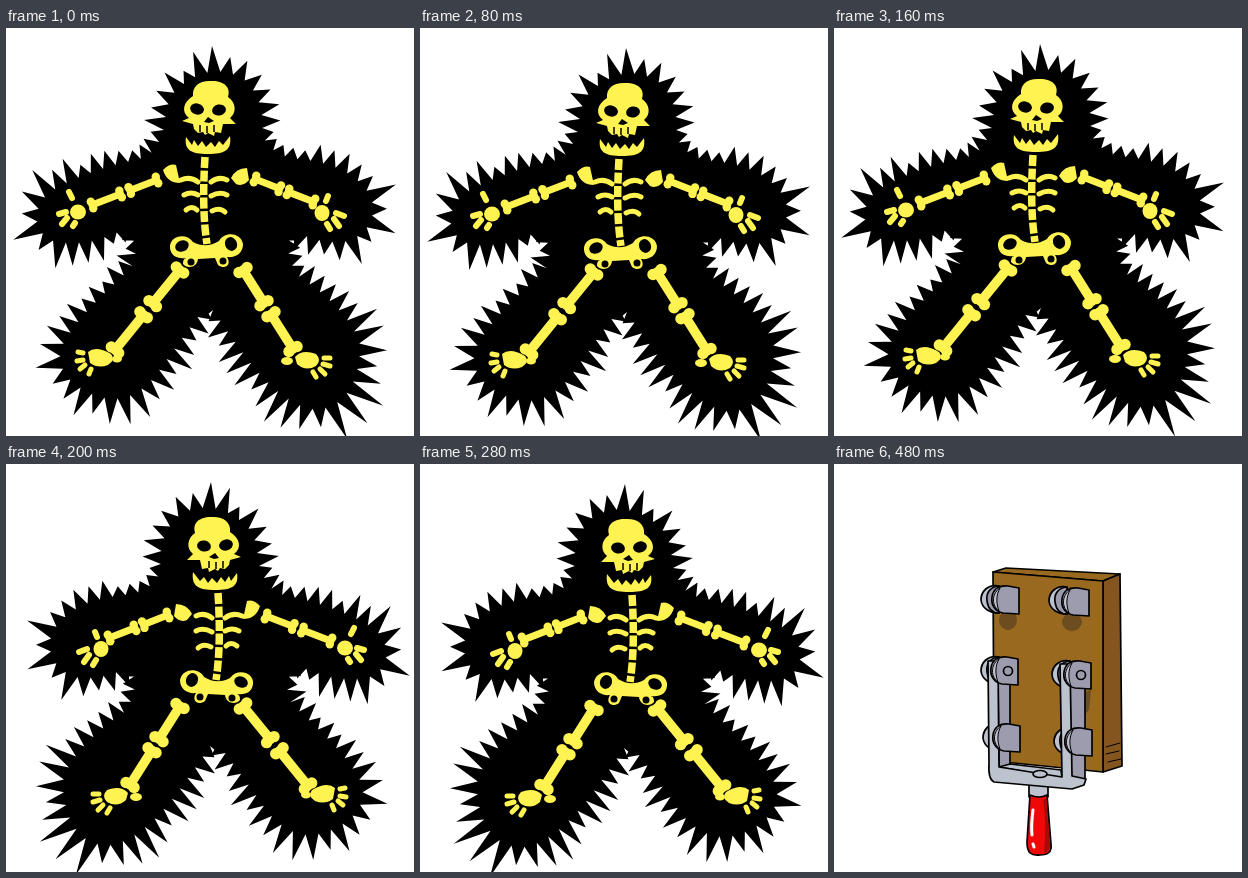
Animation of 408x408 px, one loop 0.68 s. Source, as an HTML page:

```html
<!DOCTYPE html>
<html lang="en">
<head>
<meta charset="utf-8">
<title>Knife switch shock</title>
<style>
html, body { margin: 0; width: 100%; height: 100%; overflow: hidden; background: #fff; }
svg { display: block; width: 100%; height: 100%; }

#shock, #up, #down, #jolt { animation: 680ms step-end infinite; }
#shock { animation-name: shock; }
#up { animation-name: up; }
#down { animation-name: down; }
#jolt { animation-name: jolt; }

@keyframes shock { 0% { visibility: visible; } 47.05%, 100% { visibility: hidden; } }
@keyframes up { 0% { visibility: hidden; } 47.05% { visibility: visible; } 70.58%, 100% { visibility: hidden; } }
@keyframes down { 0% { visibility: hidden; } 70.58%, 100% { visibility: visible; } }

/* The body flips left and right while it hops up and down. */
@keyframes jolt {
  0% { transform: none; }
  5.88% { transform: translate(411px, -2px) scaleX(-1); }
  11.76% { transform: translate(0, 2px); }
  17.64% { transform: translate(411px, 5px) scaleX(-1); }
  23.52% { transform: translate(0, -2px); }
  29.41% { transform: translate(411px, 0) scaleX(-1); }
  35.29% { transform: translate(0, -5px); }
  41.17%, 100% { transform: translate(411px, 2px) scaleX(-1); }
}

.bone { fill: #fff352; }
.stick { fill: none; stroke: #fff352; stroke-linecap: round; }
.ink { stroke: #000; stroke-width: 1.7; stroke-linejoin: round; stroke-linecap: round; }
.line { fill: none; }
.thin { stroke-width: 1; }
.wood { fill: #98691f; }
.side { fill: #85551f; }
.shade { fill: #6d4c20; }
.light { fill: #bdc2cf; }
.steel { fill: #9c9cae; }
.red { fill: #ee0808; }
.dark { fill: #a80a0a; }
.shine { fill: none; stroke: #fff; stroke-width: 3; stroke-linecap: round; }
</style>
</head>
<body>
<svg viewBox="0 0 408 408">
  <defs>
    <path id="body" d="M178 56Q208 34 238 52Q258 70 256 105Q262 127 290 131Q345 136 364 168Q374 196 345 212Q318 218 288 202Q274 222 292 248Q345 285 354 318Q350 380 308 381Q275 375 240 328L202 275Q175 310 150 346Q125 378 92 368Q50 352 55 322Q65 295 126 240Q136 220 121 200Q75 222 42 211Q20 190 42 166Q80 142 140 130Q158 115 160 90Q162 66 178 56Z"/>
    <g id="back" class="ink">
      <path class="light" d="M18 1C6-1 0 7 0 15C1 23 8 28 18 28Z"/>
      <path class="steel" d="M18 1C8 2 5 9 6 16C7 23 11 28 18 28Z"/>
    </g>
    <g id="front" class="ink">
      <path class="steel" d="M38 4V30L22 29C13 27 10 20 11 13C12 5 18 1 27 2Z"/>
      <path class="light thin" d="M19 4C12 8 9 20 18 27C15 19 15 11 19 4Z"/>
    </g>
    <g id="backs">
      <use href="#back" x="145" y="122"/><use href="#back" x="213" y="123"/>
      <use href="#back" x="145" y="193"/><use href="#back" x="216" y="197"/>
      <use href="#back" x="147" y="260"/><use href="#back" x="218" y="264"/>
    </g>
    <g id="fronts">
      <use href="#front" x="145" y="121"/><use href="#front" x="215" y="123"/>
      <use href="#front" x="144" y="192"/><use href="#front" x="217" y="196"/>
      <use href="#front" x="146" y="259"/><use href="#front" x="218" y="263"/>
      <g class="ink steel">
        <circle cx="172" cy="208" r="4.5"/><circle cx="245" cy="212" r="4.5"/>
      </g>
    </g>
    <g id="board" class="ink">
      <path class="wood" d="M157 109L170 105L284 111L267 118Z"/>
      <path class="side" d="M267 118L284 111L286 303L267 309Z"/>
      <path class="wood" d="M157 109L267 118V309L158 298Z"/>
      <path class="line thin" d="M270 284L284 280M270 291L283 288M272 299L285 296"/>
    </g>
  </defs>

  <g id="shock"><g id="jolt">
    <path id="aura"/>
    <g class="bone">
      <path d="M187 68C186 58 194 52 206 53C219 53 225 60 222 69C230 74 231 85 224 90L230 96L217 96L215 105L209 104L208 108L202 105L199 107L197 104L192 105L188 101L187 96L176 93L183 90C175 84 177 74 187 68Z"/>
      <path d="M180 109L186 117L188 112L192 118L196 113L200 119L205 114L209 119L213 113L217 117L224 108C226 122 219 126 202 126C185 126 178 122 180 109Z"/>
      <path d="M157 142Q164 135 170 137L174 155Q161 155 157 142ZM225 150Q230 140 241 140L243 152Q237 159 230 156Z"/>
      <path d="M164 220C163 208 180 204 187 214C196 219 205 218 213 213C218 203 235 204 237 216C237 226 229 230 221 229C226 237 219 242 212 237L209 230L192 231C191 240 181 241 177 236C177 232 178 231 180 230C171 231 165 228 164 220Z"/>
      <path d="M82 324Q90 317 105 326Q110 332 102 337Q92 341 84 335ZM289 329Q296 321 310 326Q316 332 310 338Q300 344 291 336Z"/>
      <ellipse cx="72" cy="184" rx="8" ry="7.5"/>
      <ellipse cx="316" cy="185" rx="7.5" ry="8"/>
      <ellipse cx="111" cy="331" rx="5" ry="3.5"/>
      <ellipse cx="281" cy="333" rx="6" ry="4"/>
    </g>
    <ellipse cx="191" cy="81" rx="7" ry="5.5" transform="rotate(15 191 81)"/>
    <ellipse cx="213" cy="82" rx="7" ry="5.5" transform="rotate(-12 213 82)"/>
    <path d="M198 94L202 89L208 93L203 95Z"/>
    <path d="M194 97V104M201 98V105M208 97V104" stroke="#000" stroke-width="1.5"/>
    <ellipse cx="176" cy="218" rx="7" ry="5.5" transform="rotate(-25 176 218)"/>
    <ellipse cx="225" cy="216" rx="6" ry="7" transform="rotate(-20 225 216)"/>
    <circle cx="185" cy="234" r="3.5"/><circle cx="217" cy="233" r="3.5"/>

    <path class="stick" stroke-width="7.5" stroke-dasharray="11 2.5" style="stroke-linecap:butt" d="M199 129C197 160 197 190 201 216"/>
    <path class="stick" stroke-width="5" d="M175 152Q184 148 192 154M178 167Q185 163 192 167M180 182Q186 177 191 182M205 154Q213 148 221 152M205 168Q214 163 221 167M206 183Q214 179 219 184"/>
    <path class="stick" stroke-width="6" d="M63 164L66 170M53 186L60 184M56 196L61 190M67 198L69 195M322 168L320 173M330 185L338 188M328 191L333 198M321 196L324 201"/>
    <path class="stick" stroke-width="5" d="M72 324L77 325M71 333L77 332M74 341L79 337M83 346L85 341M318 330L324 330M317 336L324 338M314 341L319 346M307 344L310 349"/>
    <g id="limbs"></g>
  </g></g>

  <g id="up">
    <use href="#board"/>
    <g class="shade">
      <path d="M176 108L217 112V130L176 124Z"/>
      <ellipse cx="173" cy="227" rx="9" ry="10"/><ellipse cx="244" cy="231" rx="10" ry="9"/>
    </g>
    <use href="#backs"/>
    <g class="ink">
      <path class="steel" d="M163 106H175L174 197H163ZM227 103L246 96L247 200H227Z"/>
      <path class="light" d="M152 97L160 93L240 94L246 97L228 104V204H218V111L163 106V200H153Z"/>
      <path class="line" d="M153 97L228 104L238 100"/>
    </g>
    <use href="#fronts"/>
    <g class="ink">
      <path class="light" d="M194 82H214L215 95Q205 99 194 95Z"/>
      <path class="red" d="M194 83L193 40C192 26 196 20 205 20C214 20 218 26 217 38L214 82Q204 87 194 83Z"/>
    </g>
    <path class="dark" d="M213 27Q217 32 216 40L213 81L207 84Q213 55 213 27Z"/>
    <path class="shine" d="M200 31Q198 43 199 56M199 69V76"/>
  </g>

  <g id="down">
    <use href="#board" x="2" y="-1"/>
    <g class="shade">
      <ellipse cx="174" cy="156" rx="9" ry="10"/><ellipse cx="238" cy="158" rx="10" ry="9"/>
      <path d="M251 228L257 226L255 246L251 250Z"/>
    </g>
    <use href="#backs" x="2" y="-1"/>
    <g class="ink">
      <path class="light" d="M195 318H214V333Q205 337 195 333Z"/>
      <path class="steel" d="M164 218H176V301L165 304ZM236 222H251V316L237 317Z"/>
      <path class="light" d="M165 303L176 300L227 306L228 314Z"/>
      <path class="light" d="M154 197H164L165 303L228 313L226 200H236L238 312L252 315L250 321L238 325L160 318Q154 315 155 300Z"/>
      <ellipse class="light" cx="206" cy="310" rx="7" ry="3.5"/>
    </g>
    <use href="#fronts" x="2" y="-1"/>
    <path class="red ink" d="M196 331Q205 335 213 331L217 380C218 388 214 391 206 391C197 392 193 389 193 378Z"/>
    <path class="dark" d="M212 335L216 380Q216 388 210 389Q213 360 209 335Z"/>
    <path class="shine" d="M199 346Q197 361 198 371M199 380L200 383"/>
  </g>
</svg>
<script>
const $ = id => document.getElementById(id);

function seeded(seed) {
  return () => (seed = seed * 16807 % 2147483647) / 2147483647;
}

// Zigzag along the body outline; spikes grow with distance from the belly.
function spikes(outline, step) {
  const random = seeded(29), total = outline.getTotalLength();
  const count = Math.round(total / step), gap = total / count;
  let d = "";
  for (let i = 0; i < count; i++) {
    const a = outline.getPointAtLength(i * gap);
    const b = outline.getPointAtLength((i + 1) * gap % total);
    const x = (a.x + b.x) / 2, y = (a.y + b.y) / 2;
    const size = (4 + 0.11 * Math.hypot(x - 203, y - 190)) * (0.6 + 0.8 * random());
    const chord = Math.hypot(b.x - a.x, b.y - a.y);
    const nx = (b.y - a.y) / chord, ny = (a.x - b.x) / chord;
    d += `${i ? "L" : "M"}${a.x} ${a.y}L${x + nx * size} ${y + ny * size}`;
  }
  return d + "Z";
}

// A shaft with two knobs at each end.
function bone(x1, y1, x2, y2, w) {
  const k = w * 0.5 / Math.hypot(x2 - x1, y2 - y1);
  const nx = (y1 - y2) * k, ny = (x2 - x1) * k;
  const knob = (x, y) => `<circle class="bone" cx="${x}" cy="${y}" r="${w * 0.6}"/>`;
  return `<path class="stick" stroke-width="${w}" d="M${x1} ${y1}L${x2} ${y2}"/>` +
    knob(x1 + nx, y1 + ny) + knob(x1 - nx, y1 - ny) +
    knob(x2 + nx, y2 + ny) + knob(x2 - nx, y2 - ny);
}

// Two bones in a row with a gap at the joint.
function limb(x1, y1, x2, y2, w) {
  const at = t => [x1 + (x2 - x1) * t, y1 + (y2 - y1) * t];
  return bone(...at(0), ...at(0.42), w) + bone(...at(0.56), ...at(1), w);
}

$("aura").setAttribute("d", spikes($("body"), 13));
$("limbs").innerHTML =
  limb(151, 152, 86, 177, 7) + limb(249, 151, 308, 174, 7) +
  limb(174, 242, 109, 322, 9.5) + limb(237, 242, 287, 321, 9.5);
</script>
</body>
</html>
```
